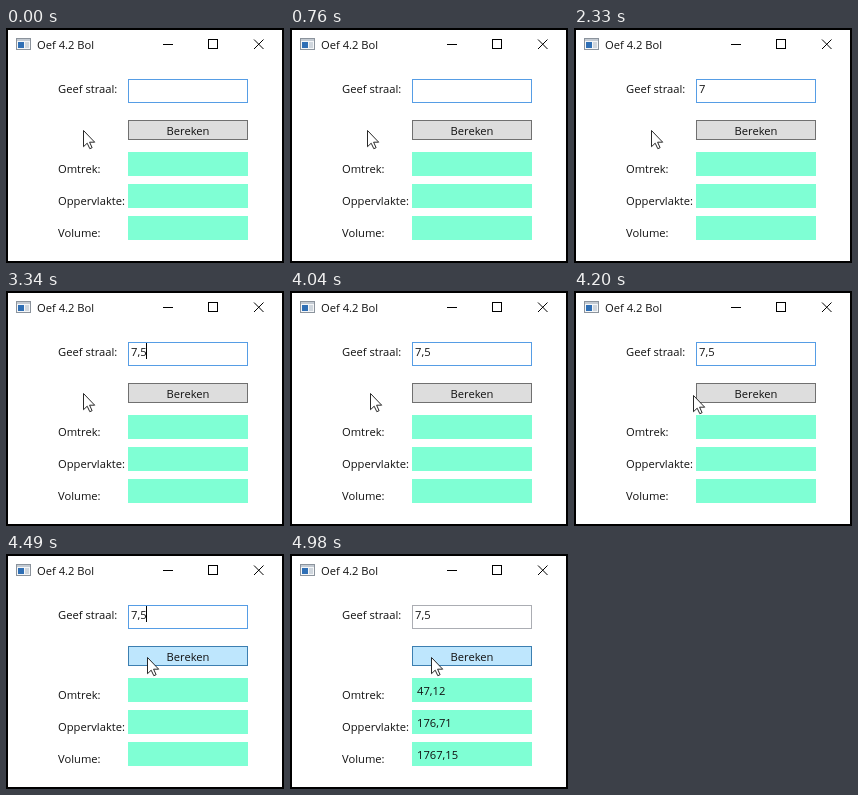
Recreate the animation shown at these times as an HTML page. Size 278x235 px, loop 7.81 s.

```html
<!DOCTYPE html>
<html lang="nl">
<head>
<meta charset="utf-8">
<title>Oef 4.2 Bol</title>
<style>
  html, body { margin: 0; width: 100%; height: 100%; overflow: hidden; background: #fff; }
  svg { display: block; width: 278px; height: 235px; }
  text { font: 11.2px "Open Sans", "Noto Sans", sans-serif; fill: #111; white-space: pre; }
  .crisp { shape-rendering: crispEdges; }
</style>
</head>
<body>
<svg viewBox="0 0 278 235">
  <g class="crisp">
    <rect width="278" height="235"/>
    <rect x="2" y="2" width="274" height="231" fill="#fff"/>
    <rect x="10.5" y="10.5" width="14" height="11" fill="#f4f6f8" stroke="#8b939c"/>
    <rect x="11" y="11" width="13" height="2" fill="#c3cad2"/>
    <rect x="12" y="14" width="6" height="6" fill="#2f6fb5"/>
    <rect x="19" y="14" width="4" height="6" fill="#cfd6dd"/>
    <path d="M157 16.5h10M202.5 11.5h9v9h-9z" fill="none" stroke="#000"/>
  </g>
  <path d="M248 11.5l9.5 9.5m0-9.5l-9.5 9.5" stroke="#000"/>
  <text x="31" y="21">Oef 4.2 Bol</text>

  <text x="52" y="65">Geef straal:</text>
  <text x="52" y="145">Omtrek:</text>
  <text x="52" y="177">Oppervlakte:</text>
  <text x="52" y="209">Volume:</text>

  <g class="crisp">
    <rect id="field" x="122.5" y="51.5" width="119" height="23" fill="#fff"/>
    <rect id="button" x="122.5" y="92.5" width="119" height="19"/>
    <path d="M122 124h120v24H122zM122 156h120v24H122zM122 188h120v24H122z" fill="#7fffd4"/>
    <rect id="caret" y="52" width="1" height="16"/>
  </g>
  <text id="input" x="125" y="65"></text>
  <text x="182" y="107" text-anchor="middle">Bereken</text>
  <g id="results">
    <text x="127" y="141"></text>
    <text x="127" y="173"></text>
    <text x="127" y="205"></text>
  </g>
  <path id="pointer" d="M.5 .5v16.2l3.7-3.5 2.6 5.5 2.3-1-2.5-5.5h5.1z" fill="#fff" stroke="#111" stroke-width=".9"/>
</svg>
<script>
  const LOOP = 7810, PRESS = 4900, RELEASE = 4980, HOVER = 4260;
  const $ = id => document.getElementById(id);

  // Each track lists [start time, value...]; values hold until the next entry.
  const typing = [[0, ""], [2330, "7"], [2790, "7,"], [3340, "7,5"]];
  const caretX = [[0, null], [300, 125], [760, null], [1300, 125], [1850, null],
    [2410, 131], [2790, null], [2870, 134], [3340, 140], [3880, null],
    [4420, 140], [PRESS, null]];
  const pointerAt = [[0, 77, 102], [4040, 80, 102], [4120, 100, 103], [4200, 119, 104],
    [HOVER, 127, 104], [4350, 135, 104], [4420, 139, 103], [4490, 141, 103]];
  const buttonLook = [[0, "#dddddd", "#707070"], [HOVER, "#bee6fd", "#3c7fb1"],
    [PRESS, "#c4e5f6", "#2c628b"], [RELEASE, "#bee6fd", "#3c7fb1"]];

  const valueAt = (track, t) => track.filter(step => step[0] <= t).pop().slice(1);

  const radius = 7.5;
  const answers = [2 * Math.PI * radius, Math.PI * radius ** 2, 4 / 3 * Math.PI * radius ** 3];
  [...$("results").children].forEach((label, i) => {
    label.textContent = answers[i].toFixed(2).replace(".", ",");
  });

  function draw(t) {
    $("input").textContent = valueAt(typing, t)[0];

    const [x] = valueAt(caretX, t);
    $("caret").setAttribute("visibility", x === null ? "hidden" : "visible");
    if (x !== null) $("caret").setAttribute("x", x);

    const [fill, stroke] = valueAt(buttonLook, t);
    $("button").setAttribute("fill", fill);
    $("button").setAttribute("stroke", stroke);
    $("field").setAttribute("stroke", t < PRESS ? "#569de5" : "#abadb3");
    $("results").setAttribute("visibility", t < RELEASE ? "hidden" : "visible");
    $("pointer").setAttribute("transform", `translate(${valueAt(pointerAt, t)})`);
  }

  const start = performance.now();
  function tick() {
    draw((performance.now() - start) % LOOP);
    requestAnimationFrame(tick);
  }
  tick();
</script>
</body>
</html>
```
